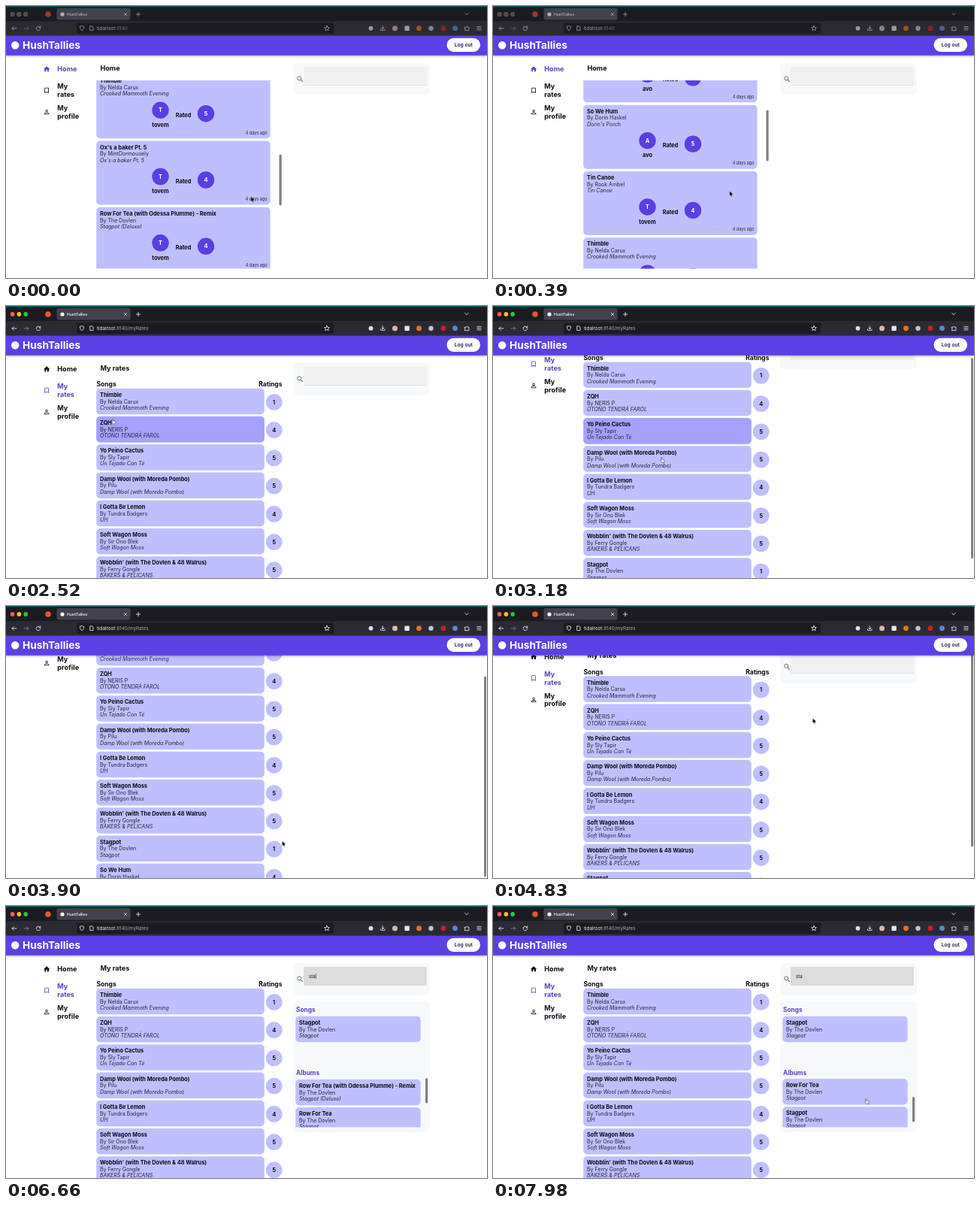
An HTML page that plays this animation: 640 px wide and 362 px high, repeating every 8 s.

```html
<!DOCTYPE html>
<html lang="en">
<head>
<meta charset="utf-8">
<title>HushTallies</title>
<style>
@property --home { syntax: "<number>"; inherits: true; initial-value: 0; }
@property --page { syntax: "<number>"; inherits: true; initial-value: 0; }
@property --albums { syntax: "<number>"; inherits: true; initial-value: 0; }
html, body { margin: 0; width: 100%; height: 100%; overflow: hidden; background: #fff; }
svg { display: block; width: 640px; height: 362px; font-family: Inter, Roboto, sans-serif; cursor: default; }
text { fill: #0b0b16; font-size: 7px; white-space: pre; }
.b { font-weight: 700; font-size: 7.35px; }
.by { fill: #26263a; }
.it { fill: #26263a; font-style: italic; }
.mid { text-anchor: middle; }
.end { text-anchor: end; }
.white { fill: #fff; }
.date { font-size: 5.5px; fill: #26263a; }
.h { font-weight: 700; font-size: 9.1px; }
.sub { font-weight: 700; font-size: 8.5px; }
.accent { font-size: 8.3px; fill: #5843c3; }
.nav { color: #0b0b16; fill: currentColor; }
.nav text { fill: currentColor; }
.card { fill: #bfbfff; }
.hot { fill: #a4a1ff; }
.dot { fill: #5a3fe2; }
.panel { fill: #f6f9fc; }
.thumb { fill: #808084; }
.line { fill: none; stroke: #ececf1; stroke-width: .85; stroke-linecap: round; stroke-linejoin: round; }
.page { transform: translateY(calc(var(--page) * -1px)); }
.pageThumb { transform: translateY(calc(max(0, var(--page)) * .824px)); }
.homeList { transform: translateY(calc(var(--home) * -1px)); }
.homeThumb { transform: translateY(calc(var(--home) * .272px)); }
.albumList { transform: translateY(calc(var(--albums) * -1px)); }
.albumThumb { transform: translateY(calc(var(--albums) * .66px)); }
.bar { fill: #5b40e6; filter: drop-shadow(0 1px 1.5px #0005); }
</style>
</head>
<body>
<svg id="stage" viewBox="0 0 640 362"></svg>
<script>
const LOOP = 8000;
const PITCH = 37.25;
const TOP = 109.7;
const CARD = 34.5;
let css = "";

// Keyframes written as [ms, declarations]
const key = (id, timing, frames) => {
  const steps = frames.map(([ms, rule]) => `${ms / LOOP * 100}%{${rule}}`).join("");
  css += `#${id}{animation:${id} ${LOOP}ms ${timing} infinite}@keyframes ${id}{${steps}}`;
};
// Shown and hidden alternately at the given times
const during = (id, ...times) => key(id, "step-end", [[0, "visibility:hidden"],
  ...times.map((ms, i) => [ms, `visibility:${i % 2 ? "hidden" : "visible"}`])]);

const text = (x, y, s, cls = "") => `<text x="${x}" y="${y}" class="${cls}">${s}</text>`;
const rect = (x, y, w, h, r, attrs) => `<rect x="${x}" y="${y}" width="${w}" height="${h}" rx="${r}" ${attrs}/>`;
const disc = (x, y, r, attrs) => `<circle cx="${x}" cy="${y}" r="${r}" ${attrs}/>`;
const line = (x, y, d) => `<path class="line" transform="translate(${x} ${y})" d="${d}"/>`;
const clip = (id, x, y, w, h) => `<clipPath id="${id}">${rect(x, y, w, h, 0, "")}</clipPath>`;

const remix = ["Row For Tea (with Odessa Plumme) - Remix", "The Dovlen", "Stagpot (Deluxe)"];
const thimble = ["Thimble", "Nelda Carux", "Crooked Mammoth Evening"];
const stagpot = ["Stagpot", "The Dovlen", "Stagpot"];
const hum = ["So We Hum", "Dorin Haskel", "Dorin's Porch"];

const feed = [
  [["Half-Newt", "Marlow Brint", "Doorknobs"], "avo", 5],
  [["Velmira: Kptz Sound Meetings, Vol. 68", "Kopatzel", "Velmira: Kptz Sound Meetings, Vol. 68"], "avo", 5],
  [hum, "avo", 5],
  [["Tin Canoe", "Rook Ambel", "Tin Canoe"], "tovem", 4],
  [thimble, "tovem", 5],
  [["Ox's a baker Pt. 5", "MintDormousely", "Ox's a baker Pt. 5"], "tovem", 4],
  [remix, "tovem", 4],
  [stagpot, "tovem", 4]
];
const rates = [
  [thimble, 1],
  [["ZQH", "NERIS P", "OTOÑO TENDRÁ FAROL"], 4],
  [["Yo Peino Cactus", "Sly Tapir", "Un Tejado Con Té"], 5],
  [["Damp Wool (with Moreda Pombo)", "Pilu", "Damp Wool (with Moreda Pombo)"], 5],
  [["I Gotta Be Lemon", "Tundra Badgers", "UH"], 4],
  [["Soft Wagon Moss", "Sir Ono Blek", "Soft Wagon Moss"], 5],
  [["Wobblin' (with The Dovlen &amp; 48 Walrus)", "Ferry Gongle", "BAKERS &amp; PELICANS"], 5],
  [stagpot, 1],
  [hum, 4]
];
const albums = [remix, ["Row For Tea", "The Dovlen", "Stagpot"], stagpot];

const song = ([title, artist, album], x, y) => text(x, y + 11.2, title, "b")
  + text(x, y + 19.8, "By " + artist, "by") + text(x, y + 28.2, album, "it");

const feedCard = ([track, user, score], i) => {
  const y = 100 + i * 88.3;
  return rect(120.2, y, 231.4, 85, 5, 'class="card"') + song(track, 125, y)
    + disc(205.5, y + 47.5, 11.2, 'class="dot"') + text(205.5, y + 50, user[0].toUpperCase(), "b mid white")
    + text(236, y + 56.6, "Rated", "b mid")
    + disc(266, y + 52, 11.2, 'class="dot"') + text(266, y + 54.6, score, "b mid white")
    + text(205.5, y + 69.8, user, "b mid") + text(347.5, y + 79.5, "4 days ago", "date end");
};
const rateCard = (y, attrs) => rect(120.2, y, 223.6, CARD, 5, attrs);
const rateText = ([track, score], i) => {
  const y = TOP + i * PITCH;
  return song(track, 125, y) + disc(356.7, y + 18.2, 10.9, 'class="card"') + text(356.7, y + 20.9, score, "b mid");
};
const hit = (track, y, attrs = "") => rect(385.3, y, 166.4, CARD, 5, 'class="card" ' + attrs) + song(track, 390, y);

const icons = {
  home: "M10 20v-6h4v6h5v-8h3L12 3 2 12h3v8z",
  mark: "M17 3H7c-1.1 0-2 .9-2 2v16l7-3 7 3V5c0-1.1-.9-2-2-2zm0 15-5-2.2L7 18V5h10z",
  person: "M12 5.9a2.1 2.1 0 1 1 0 4.2 2.1 2.1 0 0 1 0-4.2m0 9c3 0 6.1 1.5 6.1 2.1v1.1H5.9V17c0-.6 3.1-2.1 6.1-2.1M12 4a4 4 0 1 0 0 8 4 4 0 0 0 0-8zm0 9c-2.7 0-8 1.3-8 4v3h16v-3c0-2.7-5.3-4-8-4z"
};
const nav = (id, icon, y, ...lines) => `<g id="${id}" class="nav">
  <path fill-rule="evenodd" transform="translate(49.2 ${y - 4.9}) scale(.41)" d="${icons[icon]}"/>`
  + lines.map((s, i) => text(68.3, y + 3.4 + (i - (lines.length - 1) / 2) * 10.6, s, "h")).join("") + "</g>";

const search = rect(382, 76, 182, 43, 6, 'class="panel"')
  + rect(396, 81, 164, 25, 2, 'id="field"') + rect(396, 105.5, 164, .5, 0, 'fill="#d4d4d6"')
  + `<path d="M392.2 98.2l2.6 2.6" stroke="#666" stroke-width="1.1"/>` + disc(390.2, 96.2, 2.6, 'fill="none" stroke="#666" stroke-width=".9"')
  + `<text x="403" y="95.5" style="font-size:6px"><tspan id="key1">s</tspan><tspan id="key2">t</tspan><tspan id="key3">a</tspan></text>`
  + `<g id="caretShow">${rect(403, 90, .6, 7, 0, 'id="caret" fill="#222"')}</g>`;

const results = `<g id="results">${rect(382, 126, 182, 175, 6, 'class="panel"')}
  ${text(386, 140.6, "Songs", "sub accent")}${hit(stagpot, 146.7)}${text(386, 224.8, "Albums", "sub accent")}
  <g id="albumScroll"><g clip-path="url(#albumClip)"><g class="albumList">
    ${albums.map((a, i) => hit(a, 230.7 + i * PITCH, i ? "" : 'id="albumHot"')).join("")}</g></g>
    <g id="albumBar">${rect(558, 229, 3.2, 33.5, 1.6, 'class="thumb albumThumb"')}</g></g></g>`;

const page = `<g id="pageScroll"><g class="page">
  ${nav("navHome", "home", 84, "Home")}${nav("navRates", "mark", 112.3, "My", "rates")}${nav("navProfile", "person", 141, "My", "profile")}
  ${search}
  <g id="homeView">${text(125.5, 85.7, "Home", "h")}
    <g id="homeScroll"><g clip-path="url(#homeClip)"><g class="homeList">${feed.map(feedCard).join("")}</g></g>
    <g id="homeBar">${rect(363.5, 99, 3.2, 68, 1.6, 'class="thumb homeThumb"')}</g></g></g>
  <g id="ratesView">${text(125.5, 85.7, "My rates", "h")}
    ${text(120.5, 107.2, "Songs", "sub")}${text(367.5, 107.2, "Ratings", "sub end")}
    ${rates.map((_, i) => rateCard(TOP + i * PITCH, 'class="card"')).join("")}
    ${rateCard(TOP, 'id="hover" class="hot"')}
    ${rates.map(rateText).join("")}</g>
  ${results}</g>
  <g id="pageBar">${rect(636, 40, 3, 267, 1.5, 'class="thumb pageThumb"')}</g></g>`;

const header = rect(0, 38, 640, 27.7, 0, 'class="bar"') + disc(12.2, 52.2, 5.2, 'class="white"')
  + `<text x="22" y="57.2" class="white" style="font-size:13.7px;font-weight:700">HushTallies</text>`
  + rect(586.5, 42.7, 44.5, 18.3, 9.1, 'class="white"')
  + `<text x="608.8" y="54" class="mid" style="font-size:6.7px;font-weight:600;fill:#241c4c">Log out</text>`;

const lights = ["#fe5f57", "#febc2e", "#28c840"];
const chrome = rect(0, 0, 640, 20.5, 0, 'fill="#1c1b22"') + rect(0, 0, 640, 1.3, 0, 'fill="#0b5573"')
  + rect(0, 20, 640, 19.5, 0, 'fill="#2b2a33"')
  + lights.map((c, i) => disc(8.6 + i * 8.8, 10.9, 2.8, `fill="${c}"`)).join("")
  + `<g id="asleep">${lights.map((_, i) => disc(8.6 + i * 8.8, 10.9, 2.9, 'fill="#4b4c53"')).join("")}</g>`
  + rect(67.5, 3, 98, 15.5, 2, 'fill="#42414d"') + rect(94, 22.3, 342, 14.6, 2, 'fill="#1c1b22"')
  + `<g id="tools">${disc(56, 11, 3.8, 'fill="#e4572e"')}${disc(75, 11, 2.6, 'fill="#fff"')}
  <text x="81" y="12.9" class="white" style="font-size:5px;font-weight:500">HushTallies</text>
  ${line(159, 11, "M-1.6-1.6 1.6 1.6M1.6-1.6-1.6 1.6")}${line(176, 11, "M-2.6 0H2.6M0-2.6V2.6")}${line(613, 10.5, "M-2.2-1 0 1.2 2.2-1")}
  ${line(11, 29.8, "M3 0H-3M-.6-2.4-3 0-.6 2.4")}<g opacity=".45">${line(27, 29.8, "M-3 0H3M.6-2.4 3 0 .6 2.4")}</g>
  ${line(43, 29.8, "M2.4-1.4A2.8 2.8 0 1 0 2.8 .6M2.8-3V-1H.8")}
  ${line(101, 29.6, "M0-3 2.6-2.1C2.6.6 1.8 2.1 0 3-1.8 2.1-2.6.6-2.6-2.1Z")}
  ${line(114, 29.6, "M-1.9-2.8H.8L2-1.6V2.8H-1.9Z")}
  <text x="121" y="31.8" style="font-size:6.3px;fill:#f4f4f8">tidalroot<tspan fill="#a9a9b2">:8140</tspan><tspan id="path" fill="#a9a9b2">/myRates</tspan></text>
  ${line(427, 29.6, "M0-3.4 1 -1.1 3.4-.9 1.6.7 2.1 3 0 1.8-2.1 3-1.6.7-3.4-.9-1-1.1Z")}
  ${disc(485.5, 29.7, 2.9, 'fill="#e0e0e5"')}
  ${line(501.3, 29.5, "M0-2.8V1.2M-1.7-.4 0 1.2 1.7-.4M-2.8 1.4V2.8H2.8V1.4")}
  ${disc(517.5, 29.7, 3.5, 'fill="#d9b9a8"')}${rect(530.4, 26.6, 6.4, 6.4, 1, 'fill="#e6e6e6"')}
  ${disc(549.5, 29.7, 3.4, 'fill="#e2761b"')}${disc(565.5, 29.7, 3.2, 'fill="#c4c5cb"')}
  ${disc(582, 29.7, 3.4, 'fill="#c8202a"')}${disc(597.5, 29.7, 3.4, 'fill="#5b86e0"')}
  ${line(613.3, 29.8, "M-2.8-1.5H-1A1 1 0 1 1 1-1.5H2.6V2.8H-2.8V1.6A.9.9 0 0 0-2.8-.2Z")}
  ${line(629.5, 29.6, "M-2.6-2.2H2.6M-2.6 0H2.6M-2.6 2.2H2.6")}</g>`;

const pointer = `<g id="pointer">
  <path id="arrow" transform="scale(.85)" d="M0 0V7.2L1.7 5.6 2.8 8.2 4 7.7 2.9 5.2H5.2Z" stroke="#fff" stroke-width=".6" paint-order="stroke"/>
  <path id="hand" transform="scale(.9)" d="M.6 0c.6 0 .8.4.8.9V3l2.6.6c.6.2.8.6.7 1.2L4.3 7.4H1.2L-1 4.7c-.3-.6.2-1 .8-.7V.9C-.2.4.1 0 .6 0Z" fill="#fff" stroke="#111" stroke-width=".6"/>
  <path id="beam" d="M-1.2-.5Q0-.5 0 .5V6.5Q0 7.5-1.2 7.5M1.2-.5Q0-.5 0 .5V6.5Q0 7.5 1.2 7.5" fill="none" stroke="#222" stroke-width=".7"/></g>`;

// Scrolling
key("homeScroll", "linear", [[0, "--home:362"], [30, "--home:362;animation-timing-function:cubic-bezier(.35,.1,.3,1)"],
  [930, "--home:0"], [LOOP, "--home:0"]]);
key("pageScroll", "linear", [[0, "--page:0"], [2820, "--page:0;animation-timing-function:ease-in"],
  [3180, "--page:35;animation-timing-function:ease-out"], [3600, "--page:65"],
  [4470, "--page:65;animation-timing-function:ease-in"], [4900, "--page:0;animation-timing-function:ease-out"],
  [5010, "--page:-9"], [5130, "--page:-3.4;animation-timing-function:ease-out"], [5310, "--page:0"], [LOOP, "--page:0"]]);
key("albumScroll", "linear", [[0, "--albums:0"], [7560, "--albums:0;animation-timing-function:ease-out"],
  [7960, "--albums:38"], [LOOP, "--albums:38"]]);
during("homeBar", 0, 1560);
during("pageBar", 2820, 5610);
during("albumBar", 6540, 7020, 7560);

// Views and window state
during("homeView", 0, 2040);
during("ratesView", 2040);
during("path", 2040);
during("results", 6540);
during("asleep", 0, 1230);
key("tools", "step-end", [[0, "opacity:.6"], [1230, "opacity:1"]]);
key("navHome", "step-end", [[0, "color:#5843c3"], [2040, "color:#0b0b16"]]);
key("navRates", "step-end", [[0, "color:#0b0b16"], [2040, "color:#5843c3"]]);

// Hovered row: [ms, index], -1 for none
key("hover", "step-end", [[0, -1], [2460, 0], [2520, 1], [2620, 2], [3240, 3], [3420, 4], [3690, 5], [3735, 6],
  [3780, 7], [3870, -1]].map(([ms, i]) => [ms, i < 0 ? "opacity:0" : `opacity:1;transform:translateY(${i * PITCH}px)`]));
key("albumHot", "step-end", [[0, "fill:#bfbfff"], [7200, "fill:#a4a1ff"]]);

// Search field
key("field", "step-end", [[0, "fill:#f0f0f0"], [5580, "fill:#e7e7e7"], [6060, "fill:#dcdcdc"]]);
[6240, 6390, 6510].forEach((ms, i) => during("key" + (i + 1), ms));
during("caretShow", 6060, 6870);
key("caret", "step-end", [[0, 0], [6240, 3.2], [6390, 5.4], [6510, 8.8]].map(([ms, x]) => [ms, `transform:translateX(${x}px)`]));

// Pointer
key("pointer", "ease-in-out", [[0, 326, 254], [300, 326, 254], [810, 153, 138], [1260, 153, 138], [1950, 80, 112],
  [2370, 80, 112], [2700, 224, 201.5], [3630, 224, 201.5], [3810, 312, 309], [3900, 367.5, 313], [4400, 378, 305],
  [4980, 433, 125], [5250, 433, 125], [5700, 440, 93], [6870, 440, 93], [7350, 496, 256.5], [LOOP, 496, 256.5]]
  .map(([ms, x, y]) => [ms, `transform:translate(${x}px,${y}px)`]));
during("arrow", 0, 1860, 2400, 2460, 3870, 5580, 6870, 7170);
during("hand", 1860, 2400, 2460, 3870, 7170);
during("beam", 5580, 6210);

document.head.appendChild(document.createElement("style")).textContent = css;
document.getElementById("stage").innerHTML = `<defs>${clip("homeClip", 120, 99, 240, 250.5)}${clip("albumClip", 382, 229.5, 176, 65)}</defs>`
  + page + header + chrome + pointer;
</script>
</body>
</html>
```
